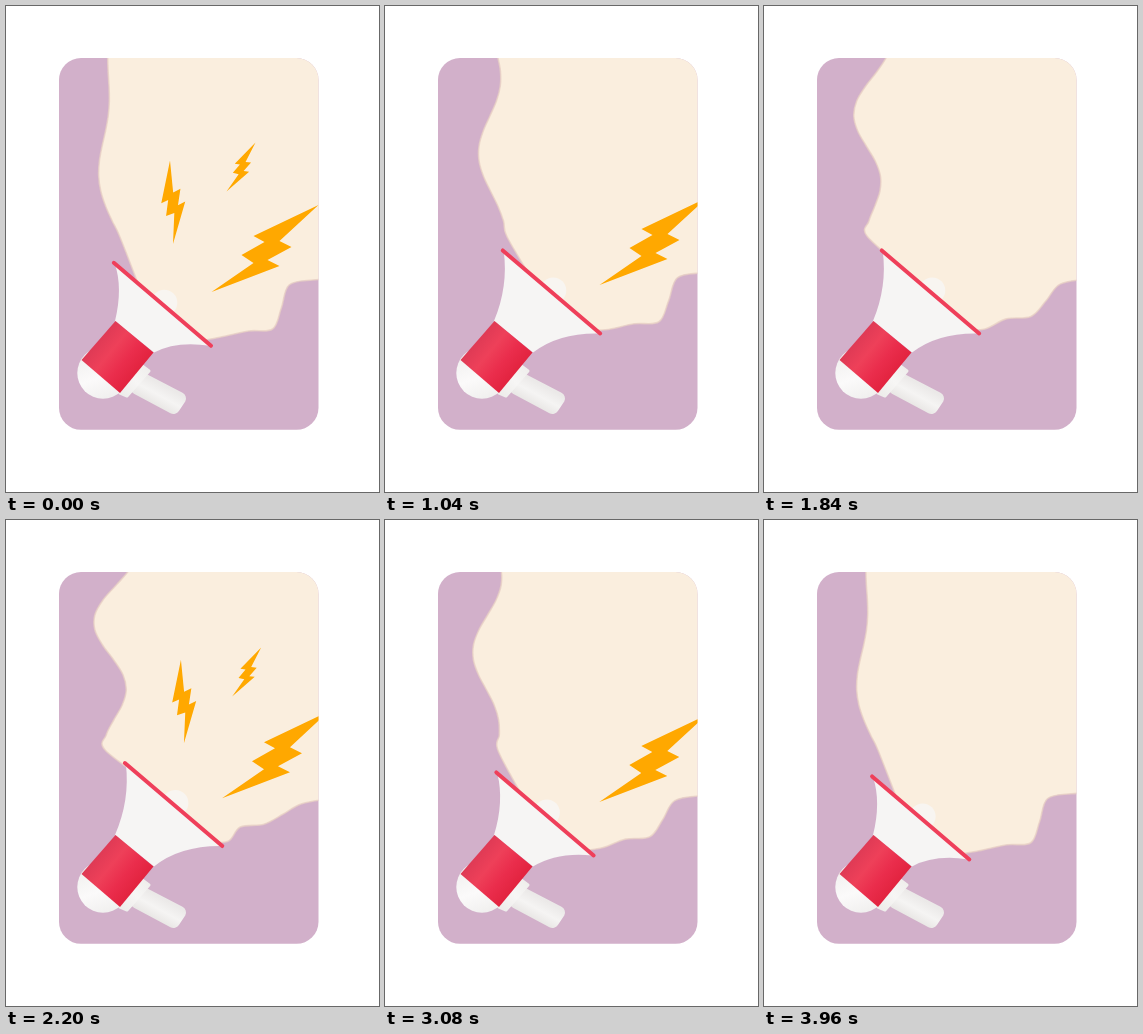
An HTML page with a canvas for the animation above (4000 ms loop, 373x486 px).

```html
<!DOCTYPE html>
<html lang="en">
<head>
<meta charset="utf-8">
<title>Megaphone</title>
<style>
  html, body { margin: 0; width: 100%; height: 100%; overflow: hidden; background: #fff; }
  canvas { display: block; width: 373px; height: 486px; }
</style>
</head>
<body>
<canvas id="stage"></canvas>
<script>
const LOOP = 4000, STEP = 40, PULSE = 800, BLINK = 2000;
const canvas = document.getElementById('stage');
const ctx = canvas.getContext('2d');
const scale = window.devicePixelRatio || 1;
canvas.width = 373 * scale;
canvas.height = 486 * scale;

// Bolt outline measured from its lower tip; the first point is the upper tip.
const BOLT = [[107, -87], [42, -56], [53, -50], [30, -37], [42, -29],
              [0, 0], [68, -26], [56, -32], [80, -45], [68, -51]];
// Each bolt drifts over the loop and is pushed by every pulse of the horn.
const BOLTS = [
  { tip: [205.5, 286], top: [107, -87], drift: [11, -3], push: [-1, -11], from: 900 },
  { tip: [167, 238], top: [-3, -83.5], drift: [11, -5], push: [0, -22], from: 1300 },
  { tip: [220.5, 185.5], top: [29, -49], drift: [-1, -5], push: [15, -9], from: 1300 }
];

// The cloud's lower edge changes between these two outlines.
const NOTCH = [[215, 331], [244, 325], [269, 323], [279, 302], [288, 279], [313, 274]];
const SLOPE = [[216, 329], [225, 314], [247, 311], [266, 302], [284, 293], [313, 288]];

const mix = (a, b, k) => a + (b - a) * k;
const wave = (t, peak, period) => Math.cos(2 * Math.PI * (t - peak) / period);
const bump = (t, peak, period, power) => ((1 + wave(t, peak, period)) / 2) ** power;
const stretchAt = t => bump(t, 425, PULSE, 1.58);

function polygon(points) {
  ctx.beginPath();
  points.forEach(p => ctx.lineTo(...p));
  ctx.closePath();
}

function gradient(x1, y1, x2, y2, colors) {
  const g = ctx.createLinearGradient(x1, y1, x2, y2);
  colors.forEach((c, i) => g.addColorStop(i / (colors.length - 1), c));
  return g;
}

// Smooth curve through points, continuing the current path.
function spline(points) {
  const at = i => points[Math.max(0, Math.min(points.length - 1, i))];
  ctx.lineTo(...points[0]);
  for (let i = 0; i < points.length - 1; i++) {
    const [a, b, c, d] = [at(i - 1), at(i), at(i + 1), at(i + 2)];
    ctx.bezierCurveTo(b[0] + (c[0] - a[0]) / 6, b[1] + (c[1] - a[1]) / 6,
                      c[0] - (d[0] - b[0]) / 6, c[1] - (d[1] - b[1]) / 6, ...c);
  }
}

function drawCloud(t, e, a, b) {
  const swing = wave(t, 200, LOOP);
  const swell = bump(t, 2400, LOOP, 2);

  // left edge: a gentle curve carrying one ripple that slides up and down
  const ripple = 4 + 9 * e + 10 * swell;
  const left = [];
  for (let y = 35; y <= 230; y += 15) {
    const d = y - 150;
    const base = 96 + 0.00163 * d ** 2 + 7e-6 * d ** 3;
    left.push([base + 14 * e + ripple * wave(y, 70 + 38 * swing, 135), y]);
  }

  const lower = NOTCH.map(([x, y], i) => [
    mix(x, SLOPE[i][0], swell ** 2) + 14 * e - 1.3 * swing * i,
    mix(y, SLOPE[i][1], swell ** 2) - 18 * e
  ]);
  const end = lower[lower.length - 1];

  ctx.beginPath();
  ctx.moveTo(350, 20);
  ctx.lineTo(left[0][0], 20);
  spline([...left, [a[0] + 24, a[1] + 20]]);
  spline([[b[0] - 16, b[1] - 4], ...lower, [end[0] + 30, end[1] - 1]]);
  ctx.closePath();
  ctx.fillStyle = '#faeede';
  ctx.strokeStyle = 'rgba(232, 208, 196, .75)';
  ctx.lineWidth = 1.6;
  ctx.fill();
  ctx.stroke();
}

function drawBolt({ tip, top, drift, push, from }, t, e) {
  const phase = t % BLINK;
  if (phase >= 300 && (phase < from || phase >= 1800)) return;
  const away = Math.sqrt(Math.sin(Math.PI * t / LOOP));
  const [px, py] = tip.map((v, i) => v + drift[i] * away + push[i] * e);
  // rotate and scale the outline so that its upper tip lands on `top`
  const [ux, uy] = BOLT[0], size = ux * ux + uy * uy;
  const c = (top[0] * ux + top[1] * uy) / size;
  const s = (top[1] * ux - top[0] * uy) / size;
  polygon(BOLT.map(([x, y]) => [px + c * x - s * y, py + s * x + c * y]));
  ctx.fillStyle = '#ffa800';
  ctx.fill();
}

function drawMegaphone(e, a, b) {
  // bulge in the mouth
  ctx.fillStyle = '#f8f5f1';
  ctx.beginPath();
  ctx.arc(a[0] + 50.5, a[1] + 40, 13, 0, 7);
  ctx.fill();

  // rear cap
  ctx.fillStyle = gradient(84, 350, 100, 394, ['#f2f1f0', '#fbfafa', '#f0efee']);
  ctx.beginPath();
  ctx.arc(97, 367, 25.7, 0, 7);
  ctx.fill();

  // handle
  ctx.lineJoin = 'round';
  ctx.lineWidth = 13;
  ctx.fillStyle = ctx.strokeStyle = gradient(158, 379, 147, 399, ['#ebe9e8', '#f5f4f3', '#e8e6e4']);
  polygon([[136, 373], [173.5, 392.5], [167.5, 401.5], [131, 382]]);
  ctx.fill();
  ctx.stroke();
  ctx.lineWidth = 3;
  ctx.fillStyle = ctx.strokeStyle = gradient(116, 386, 142, 362, ['#eeedeb', '#f7f6f5', '#efeeec']);
  polygon([[135, 359], [143, 365], [121, 390], [114, 387]]);
  ctx.fill();
  ctx.stroke();

  // horn
  ctx.fillStyle = '#f6f5f4';
  ctx.beginPath();
  ctx.moveTo(109, 315);
  ctx.quadraticCurveTo(117 + 16 * e, 282 - 4 * e, a[0] + 1, a[1] + 1);
  ctx.lineTo(b[0] - 1, b[1]);
  ctx.quadraticCurveTo(170.5 + 8 * e, 334.5 - 20 * e, 148, 346.5);
  ctx.fill();

  // body
  ctx.fillStyle = gradient(92, 335, 131, 367, ['#df3a55', '#ee4059', '#ea2d4c', '#e2233f']);
  polygon([[109.5, 315], [147.5, 346.5], [114, 387], [75.5, 354]]);
  ctx.fill();

  // rim
  ctx.strokeStyle = '#ef3f5a';
  ctx.lineWidth = 4;
  ctx.lineCap = 'round';
  ctx.beginPath();
  ctx.moveTo(...a);
  ctx.lineTo(...b);
  ctx.stroke();
}

function draw(t) {
  const e = stretchAt(t);
  const a = [107.8 + 25 * e, 256.8 - 31 * e];
  const b = [205 + 25.5 * e, 339.8 - 31 * e];
  ctx.setTransform(scale, 0, 0, scale, 0, 0);
  ctx.fillStyle = '#fff';
  ctx.fillRect(0, 0, 373, 486);
  ctx.save();
  ctx.beginPath();
  ctx.roundRect(53, 52, 259.5, 371.8, 22);
  ctx.fillStyle = '#d2b0ca';
  ctx.fill();
  ctx.clip();
  drawCloud(t, e, a, b);
  BOLTS.forEach(bolt => drawBolt(bolt, t, e));
  ctx.restore();
  drawMegaphone(e, a, b);
}

const start = performance.now();
function tick() {
  const t = (performance.now() - start) % LOOP;
  draw(Math.floor(t / STEP) * STEP);
  requestAnimationFrame(tick);
}
tick();
</script>
</body>
</html>
```
